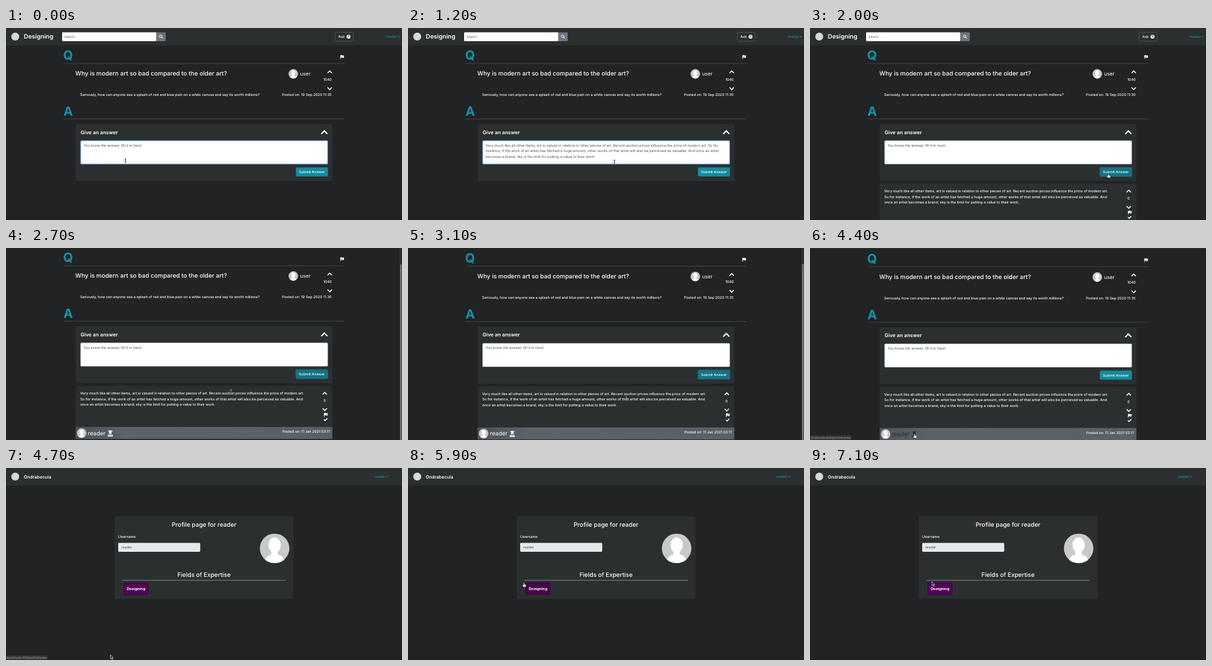
An HTML page that plays this animation: 600x291 px, repeating every 7.8 s.

```html
<!DOCTYPE html>
<html lang="en">
<head>
<meta charset="utf-8">
<title>Question page</title>
<style>
  html, body { margin: 0; width: 100%; height: 100%; overflow: hidden; background: #212324; }
  svg { display: block; width: 600px; height: 291px; }
  text { font: 500 5.4px Inter, sans-serif; fill: #fff; white-space: pre; text-rendering: geometricPrecision; }
  .brand { font-size: 9.2px; font-weight: 600; }
  .head { font-size: 9.15px; }
  .letter { font-size: 19.3px; font-weight: 700; fill: #1693a6; }
  .mid { text-anchor: middle; }
  .dark { fill: #495057; font-weight: 400; }
  .teal { fill: #1797ab; font-size: 5.7px; font-weight: 400; }
  .panel { fill: #2b2f30; }
  .rule { stroke: #55595b; stroke-width: .6; }
  .line { fill: none; stroke: #fff; stroke-width: 1.4; }
</style>
</head>
<body>
<svg viewBox="0 0 600 291">
  <defs>
    <linearGradient id="bar">
      <stop stop-color="#4c5459"/><stop offset=".2" stop-color="#5b6369"/><stop offset="1" stop-color="#596066"/>
    </linearGradient>
    <clipPath id="round"><circle r="10"/></clipPath>
    <g id="avatar">
      <circle r="10" fill="#c8c9c9"/>
      <g clip-path="url(#round)" fill="#fff">
        <ellipse cy="-2.2" rx="4.2" ry="5.2"/>
        <path d="M-2.2 1V4.2Q-6.5 5-7 10H7Q6.5 5 2.2 4.2V1z"/>
      </g>
    </g>
    <path id="up" class="line" d="M-3.3 1.7L0-1.6 3.3 1.7"/>
    <path id="flag" fill="#fff" d="M-2.7-3v6h.8V.9q1.3-.7 2.3 0t2.4-.2v-3.4q-1.3.7-2.4.1t-2.3 0V-3z"/>
    <path id="caret" fill="#1797ab" d="M0 0h3.2L1.6 1.8z"/>
    <g id="navbar">
      <rect class="panel" width="600" height="26.5"/>
      <circle cx="14" cy="13" r="6" fill="#d8d8d8"/>
    </g>
  </defs>

  <g id="question">
    <use href="#navbar"/>
    <text class="brand" x="27" y="16">Designing</text>
    <rect x="85" y="6.5" width="143" height="13.5" rx="1.4" fill="#fff"/>
    <text class="dark" x="88.5" y="15.3" style="font-size:4.7px">Search...</text>
    <path d="M227.5 6.5h13q1.5 0 1.5 1.5v10.5q0 1.5-1.5 1.5h-13z" fill="#6c757d"/>
    <g class="line" style="stroke-width:1"><circle cx="234.4" cy="12.6" r="1.8"/><path d="M235.7 13.9l2 2"/></g>
    <rect x="499" y="6.5" width="27" height="13.5" rx="1.5" fill="none" stroke="#5b6063" stroke-width=".7"/>
    <text x="503.5" y="15.2">Ask</text>
    <circle cx="519" cy="13.2" r="2.9" fill="#fff"/>
    <text class="mid" x="519" y="15" style="font-size:4.8px;font-weight:800;fill:#2b2f30">?</text>
    <text class="teal" x="575" y="15.2">reader</text>
    <use href="#caret" x="593.5" y="12.5"/>

    <text class="letter" x="86.5" y="48.4">Q</text>
    <use href="#flag" x="509.3" y="44"/>
    <path class="rule" d="M87 53.9H513M87 137.8H513"/>
    <text class="head" x="105" y="72">Why is modern art so bad compared to the older art?</text>
    <use href="#avatar" transform="translate(435.3 69.5) scale(.72)"/>
    <text x="445.5" y="72.2" style="font-size:7.7px;font-weight:400">user</text>
    <use href="#up" x="490.5" y="66.6"/>
    <text class="mid" x="487.2" y="79.7">1040</text>
    <use href="#up" transform="translate(490.5 91.8) scale(1 -1)"/>
    <text x="112.3" y="103.2">Seriously, how can anyone see a splash of red and blue pain on a white canvas and say its worth millions?</text>
    <text x="418.2" y="103.2">Posted on: 19 Sep 2020 11:35</text>
    <text class="letter" x="87" y="133">A</text>

    <rect class="panel" x="105.5" y="145.5" width="389" height="86.5"/>
    <text x="113" y="160.6" style="font-size:7.65px;font-weight:600">Give an answer</text>
    <use href="#up" transform="translate(482.3 158.2) scale(1.4)"/>
    <rect id="field" x="113" y="170.7" width="374.5" height="35.5" rx="1.5" fill="#fff"/>
    <text class="dark" id="hint" x="117.5" y="179.7">You know the answer, fill it in here!</text>
    <path id="typing" d="M117.5 174v7" stroke="#222" stroke-width=".6"/>
    <g id="draft">
      <text class="dark" x="117.5" y="179.7">Very much like all other items, art is valued in relation to other pieces of art. Recent auction prices influence the price of modern art. So for</text>
      <text class="dark" x="117.5" y="188.4">instance, if the work of an artist has fetched a huge amount, other works of that artist will also be perceived as valuable. And once an artist</text>
      <text class="dark" x="117.5" y="197.1">becomes a brand, sky is the limit for putting a value to their work.</text>
    </g>
    <rect id="submit" x="439.2" y="211.3" width="48.6" height="13.8" rx="1.5"/>
    <text class="mid" x="463.4" y="220.3">Submit Answer</text>

    <g id="answer">
      <rect class="panel" x="105.5" y="235.7" width="389" height="62.5"/>
      <text x="112.6" y="249">Very much like all other items, art is valued in relation to other pieces of art. Recent auction prices influence the price of modern art.</text>
      <text x="112.6" y="257.7">So for instance, if the work of an artist has fetched a huge amount, other works of that artist will also be perceived as valuable. And</text>
      <text x="112.6" y="266.4">once an artist becomes a brand, sky is the limit for putting a value to their work.</text>
      <use href="#up" x="483" y="247.3"/>
      <text class="mid" x="482.7" y="260.3">0</text>
      <use href="#up" transform="translate(483 271.7) scale(1 -1)"/>
      <use href="#flag" x="484.5" y="279.8"/>
      <path class="line" d="M481.7 286.8l1.8 1.8 3.4-3.4"/>
      <rect x="105.5" y="298.2" width="389" height="18.3" fill="url(#bar)"/>
      <use href="#avatar" transform="translate(114.6 307.5) scale(.72)"/>
      <g id="author">
        <text x="124" y="310.7" style="font-size:8.7px;font-weight:400;fill:inherit">reader</text>
        <g transform="translate(158 308)">
          <path d="M0-4.7L4.3-3.5 0-2.2-4.3-3.5z"/>
          <circle cy="-1" r="2.1"/>
          <path d="M-4 4.5q0-3 2.3-3L0 3.2 1.7 1.5q2.3 0 2.3 3z"/>
        </g>
      </g>
      <text x="418.4" y="307">Posted on: 11 Jan 2021 03:11</text>
    </g>
  </g>

  <g id="profile">
    <use href="#navbar"/>
    <text x="27" y="15.6" style="font-size:6.7px;font-weight:600">Ondrabecula</text>
    <text class="teal" x="558" y="15.2">reader</text>
    <use href="#caret" x="576.3" y="12.5"/>
    <rect class="panel" x="164.5" y="73.3" width="271.3" height="125"/>
    <text class="head mid" x="300" y="88.6">Profile page for reader</text>
    <text x="170" y="106">Username</text>
    <rect x="170" y="113.5" width="124.3" height="13.5" rx="1.4" fill="#e7e8ec"/>
    <text class="dark" x="174.5" y="122.3">reader</text>
    <use href="#avatar" transform="translate(407 121.8) scale(2.24)"/>
    <text class="head mid" x="300" y="164.7">Fields of Expertise</text>
    <path d="M176 170.2H424" stroke="#a3a5a6" stroke-width=".7"/>
    <rect id="topic" x="178.7" y="174" width="36.5" height="17.8" rx="1.5" stroke="#2c0430" stroke-width=".8"/>
    <text class="mid" x="197" y="185" style="font-size:5.7px;font-weight:700">Designing</text>
  </g>

  <g id="scrollbar">
    <rect x="596" width="4" height="291" fill="#2b2d2e"/>
    <rect id="thumb" x="597" width="2.4" height="267" rx="1.2" fill="#737576"/>
  </g>
  <g id="status">
    <rect y="284" width="62.5" height="7" fill="#343738"/>
    <text x="1.5" y="289" style="font-size:4.2px;font-weight:400;fill:#a9abac">boothnode:4100/profile/reader</text>
  </g>
  <g id="pointer">
    <g id="beam" fill="none">
      <path d="M-1.4-3Q0-3 0-2V2Q0 3-1.4 3M1.4-3Q0-3 0-2V2Q0 3 1.4 3" stroke="#ddd" stroke-width="1.1"/>
      <path d="M-1.4-3Q0-3 0-2V2Q0 3-1.4 3M1.4-3Q0-3 0-2V2Q0 3 1.4 3" stroke="#222" stroke-width=".6"/>
    </g>
    <path id="arrow" d="M.3.3V6.2L1.6 5 2.7 7.3 3.7 6.8 2.7 4.6H4.5z" fill="#111" stroke="#fff" stroke-width=".6"/>
    <path id="hand" d="M-.7 0Q0-.7.7 0V2L3 2.7Q3.6 3 3.4 4L2.8 6H-.9L-2.6 3.6Q-2.3 2.5-.7 3.5z" fill="#fff" stroke="#111" stroke-width=".5"/>
  </g>
</svg>
<script>
const LOOP = 7800, STEP = 100;
const $ = id => document.getElementById(id);
const show = (id, on) => { $(id).style.display = on ? '' : 'none'; };
const set = (id, attrs) => { for (const k in attrs) $(id).setAttribute(k, attrs[k]); };
const within = (t, from, to) => t >= from && t < to;

const pointerPath = [
  [0, 181, 201], [100, 181, 201], [400, 175.5, 187], [900, 175.5, 187],
  [1500, 450, 219], [1700, 452, 221], [2300, 452, 221], [2700, 341, 218],
  [3100, 331, 224], [3300, 325, 228], [4100, 158.5, 282], [4600, 158.5, 282],
  [4700, 158, 283], [4800, 158, 276], [5000, 158, 233], [5200, 165, 168],
  [5400, 165, 168], [6200, 182, 178], [7100, 184.5, 172]
];
const scrollPath = [[2400, 0], [2500, 8], [2600, 22], [2700, 27], [3100, 26.3], [4000, 25.5]];
const pointerKinds = [
  [0, 'beam'], [700, ''], [900, 'beam'], [1400, 'hand'], [2400, 'beam'],
  [3500, 'arrow'], [4100, 'hand'], [4600, 'arrow'], [5900, 'hand'], [6600, 'arrow']
];

// Linear interpolation through [time, ...values] keys
function along(keys, t) {
  const i = keys.findIndex(k => k[0] > t);
  if (i < 1) return keys.at(i).slice(1);
  const a = keys[i - 1], b = keys[i], f = (t - a[0]) / (b[0] - a[0]);
  return a.slice(1).map((v, j) => v + (b[j + 1] - v) * f);
}

function draw(t) {
  const onProfile = t >= 4600;
  show('question', !onProfile);
  show('profile', onProfile);

  // Before the first key, along() must yield the resting position
  const scroll = t < 2400 ? 0 : along(scrollPath, t)[0];
  set('question', { transform: `translate(0 ${-scroll})` });
  show('scrollbar', within(t, 2500, 4100));
  set('thumb', { y: scroll * 291 / 316.5 });

  const focused = t < 1700, drafted = within(t, 900, 1800);
  set('field', { stroke: focused ? '#4f83d6' : '#b9bdc0', 'stroke-width': focused ? 1.1 : .4 });
  show('hint', !drafted);
  show('draft', drafted);
  show('typing', within(t, 300, 900));
  show('answer', t >= 1800);

  const pressed = within(t, 1500, 4100);
  set('submit', { fill: pressed ? '#147384' : '#148a9e', stroke: pressed ? '#1a6a77' : 'none' });
  set('author', { fill: t >= 4300 ? '#2a2f33' : '#fff' });
  set('topic', { fill: within(t, 5900, 6600) ? '#4a034e' : '#56045a' });
  show('status', within(t, 4300, 5000));

  const kind = pointerKinds.findLast(k => k[0] <= t)[1];
  for (const id of ['beam', 'arrow', 'hand']) show(id, id === kind);
  set('pointer', { transform: `translate(${along(pointerPath, t)})` });
}

const start = performance.now();
function tick() {
  const t = (performance.now() - start) % LOOP;
  draw(Math.floor(t / STEP) * STEP);
  requestAnimationFrame(tick);
}
tick();
</script>
</body>
</html>
```
